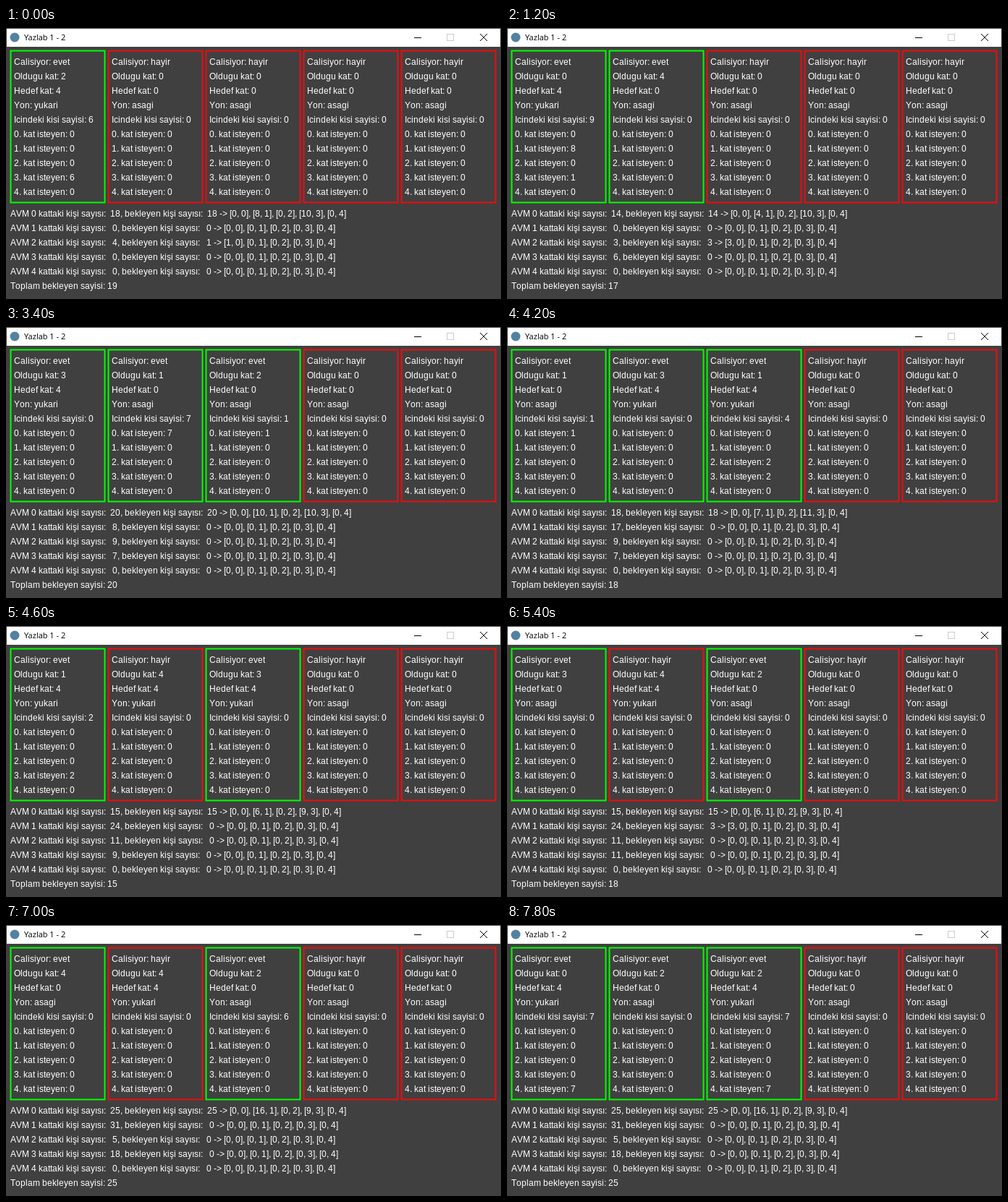
An HTML page for the animation above (8000 ms loop, 684x375 px).

```html
<!DOCTYPE html>
<html lang="tr">
<head>
<meta charset="utf-8">
<title>Yazlab 1 - 2</title>
<style>
  html, body { margin: 0; width: 100%; height: 100%; overflow: hidden; background: #404040; }
  svg { display: block; width: 684px; height: 375px; }
  text { font: 12px "Liberation Sans", Arial, sans-serif; fill: #fff; }
  .title { font: 11px "Open Sans", "Noto Sans", sans-serif; fill: #000; }
  .shaft { fill: none; stroke: #f00a0f; stroke-width: 2; }
  .shaft.on { stroke: #0f0; }
</style>
</head>
<body>
<svg id="stage" viewBox="0 0 684 375">
  <rect width="684" height="375" fill="#404040"/>
  <rect x="1" y="1" width="682" height="25" fill="#fff"/>
  <circle cx="12" cy="13" r="6.5" fill="#5382a1"/>
  <text class="title" x="25" y="17">Yazlab 1 - 2</text>
  <path d="M564 13.5h10" stroke="#000"/>
  <rect x="609.5" y="8.5" width="9" height="9" fill="none" stroke="#ccc"/>
  <path d="M655 8l10 10M665 8l-10 10" stroke="#000"/>
</svg>
<script>
const STEP_MS = 200, STEPS = 40, TOP = 4, CAPACITY = 10;
const FLOORS = [0, 1, 2, 3, 4];

// Groups who join the queue: [step, target floor, people]
const visitors = [
  [0, 3, 9], [0, 3, 1], [0, 1, 8], [6, 3, 1], [6, 1, 4], [7, 3, 7], [8, 1, 3], [9, 2, 10],
  [16, 1, 6], [18, 2, 2], [19, 3, 1], [20, 1, 7], [21, 3, 2], [23, 1, 6], [28, 3, 7],
  [29, 1, 10], [35, 1, 10], [36, 4, 7], [38, 4, 7]
];
// Groups who want to go home: [step, floor they are on, people]
const leavers = [
  [0, 2, 1], [5, 2, 3], [11, 1, 3], [14, 3, 7], [16, 2, 1], [20, 1, 1], [26, 1, 3],
  [29, 2, 3], [33, 2, 3]
];

// switches: steps that toggle the power; pauses: steps spent standing still
const makeLift = (switches = [], pauses = [], state = {}) =>
  ({ switches, pauses, floor: 0, direction: -1, on: false, riders: [], ...state });
const lifts = [
  makeLift([0], [35], { floor: 2, direction: 1, riders: [{ to: 3, people: 6 }] }),
  makeLift([2, 22, 36], [37]),
  makeLift([10], [15, 19, 25]),
  makeLift(),
  makeLift()
];
const inside = [0, 0, 4, 0, 0];
const queues = FLOORS.map(() => []);

const count = groups => groups.reduce((total, group) => total + group.people, 0);
const countTo = (groups, floor) => count(groups.filter(group => group.to === floor));

// The newest groups board first, as long as a whole group fits.
function board(lift) {
  const queue = queues[lift.floor];
  for (const group of [...queue].reverse()) {
    if (count(lift.riders) + group.people > CAPACITY) continue;
    lift.riders.push(group);
    queue.splice(queue.indexOf(group), 1);
    inside[lift.floor] -= group.people;
  }
}

function run(lift, step) {
  const moves = lift.on && !lift.pauses.includes(step);
  if (moves) lift.floor += lift.direction;
  lift.on = lift.switches.filter(s => s <= step).length % 2 === 1;
  if (!lift.on) return;
  if (lift.floor === 0) lift.direction = 1;
  if (lift.floor === TOP) lift.direction = -1;
  if (!moves) return;
  inside[lift.floor] += countTo(lift.riders, lift.floor);
  lift.riders = lift.riders.filter(group => group.to !== lift.floor);
  board(lift);
}

function liftLines({ on, floor, direction, riders }) {
  const up = direction > 0;
  return [
    `Calisiyor: ${on ? 'evet' : 'hayir'}`,
    `Oldugu kat: ${floor}`,
    `Hedef kat: ${up ? TOP : 0}`,
    `Yon: ${up ? 'yukari' : 'asagi'}`,
    `Icindeki kisi sayisi: ${count(riders)}`,
    ...FLOORS.map(f => `${f}. kat isteyen: ${countTo(riders, f)}`)
  ];
}

function mallLines() {
  const pad = n => String(n).padStart(3);
  const lines = queues.map((queue, floor) => {
    const waiting = count(queue);
    const people = floor === 0 ? waiting : inside[floor];
    return `AVM ${floor} kattaki kişi sayısı: ${pad(people)}, bekleyen kişi sayısı: ${pad(waiting)} -> ` +
      FLOORS.map(to => `[${countTo(queue, to)}, ${to}]`).join(', ');
  });
  return [...lines, `Toplam bekleyen sayisi: ${count(queues.flat())}`];
}

const scenes = Array.from({ length: STEPS }, (_, step) => {
  lifts.forEach(lift => run(lift, step));
  for (const [when, to, people] of visitors) {
    if (when === step) queues[0].push({ to, people });
  }
  for (const [when, floor, people] of leavers) {
    if (when === step) queues[floor].push({ to: 0, people });
  }
  return { power: lifts.map(lift => lift.on), lifts: lifts.map(liftLines), mall: mallLines() };
});

const stage = document.getElementById('stage');
function add(tag, attributes) {
  const node = document.createElementNS(stage.namespaceURI, tag);
  for (const [name, value] of Object.entries(attributes)) node.setAttribute(name, value);
  return stage.appendChild(node);
}

// Glyphs sit on whole pixels, as in a desktop toolkit.
const pen = document.createElement('canvas').getContext('2d');
pen.font = '12px "Liberation Sans", Arial, sans-serif';
const advance = c => Math.round(pen.measureText(c).width);

function label(x, y) {
  const node = add('text', { y });
  return content => {
    let next = x;
    const places = [...content].map(c => (next += advance(c)) - advance(c));
    node.setAttribute('x', places.join(' '));
    node.textContent = content.replace(/ /g, '\u00a0');
  };
}
const column = (rows, x, y) => Array.from({ length: rows }, (_, i) => label(x, y + 20 * i));
const write = (labels, lines) => lines.forEach((line, i) => labels[i](line));

const panels = lifts.map((_, i) => ({
  shaft: add('rect', { class: 'shaft', x: 6.5 + 135 * i, y: 31.5, width: 130, height: 210 }),
  labels: column(10, 11 + 135 * i, 51)
}));
const mallLabels = column(6, 6, 261);

let shown = -1;
function draw() {
  const step = Math.floor(performance.now() / STEP_MS) % STEPS;
  if (step !== shown) {
    shown = step;
    const scene = scenes[step];
    panels.forEach(({ shaft, labels }, i) => {
      shaft.classList.toggle('on', scene.power[i]);
      write(labels, scene.lifts[i]);
    });
    write(mallLabels, scene.mall);
  }
  requestAnimationFrame(draw);
}
draw();
</script>
</body>
</html>
```
